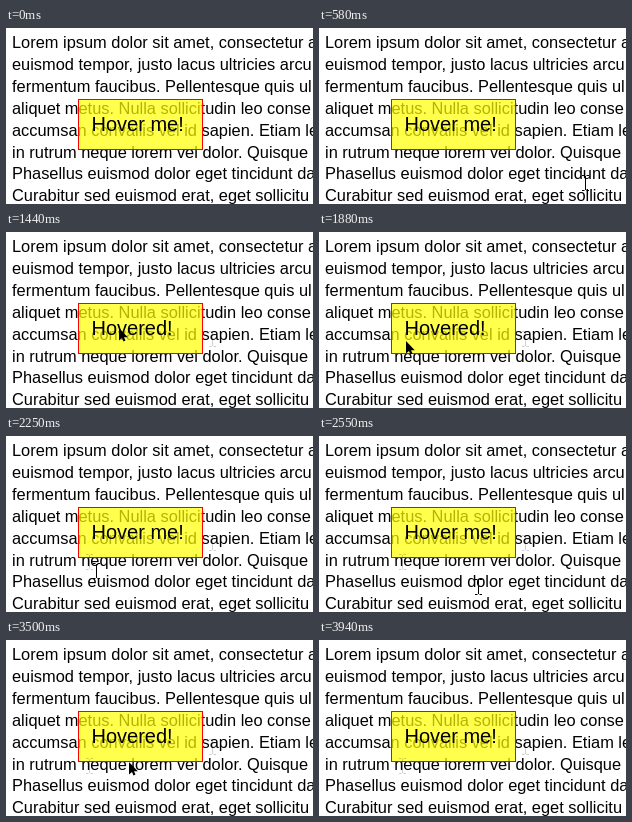
An HTML page for the animation above (4.44 s loop, 307 by 176 pixels).

```html
<!DOCTYPE html>
<html lang="en">
<head>
<meta charset="utf-8">
<title>Hover tooltip</title>
<style>
  html, body { margin: 0; width: 100%; height: 100%; overflow: hidden; background: #fff; }
  svg { display: block; width: 307px; height: 176px; font-family: "Liberation Sans", Arial, sans-serif; }
  #copy { font-size: 16.4px; }
  #label { font-size: 20px; }
  .box { fill: rgba(255, 255, 0, .7); stroke: #f00; }
  .beam { fill: none; stroke: #000; }
  .trail { opacity: .18; }
</style>
</head>
<body>
<svg viewBox="0 0 307 176">
  <defs>
    <path id="beam" class="beam" d="M-3 -7.5H-.5M1.5 -7.5H4M-3 7.5H-.5M1.5 7.5H4M.5 -7V7"/>
    <path id="arrow" d="M1 1V13.5L4 11L5.5 14.5L7.5 13.6L6 10.3H9.8Z"/>
  </defs>
  <g id="copy"></g>
  <rect class="box" x="72.5" y="71.5" width="124" height="50"/>
  <text id="label" x="85.5" y="103">Hover me!</text>
  <use class="trail" href="#beam"/>
  <use class="trail" href="#beam"/>
  <use id="cursor" href="#beam"/>
</svg>
<script>
  const LOOP = 4440, START = 430, STEP = 73.125;
  const STROKE = 8; // steps per pointer stroke
  const lines = [
    "Lorem ipsum dolor sit amet, consectetur a",
    "euismod tempor, justo lacus ultricies arcu",
    "fermentum faucibus. Pellentesque quis ul",
    "aliquet metus. Nulla sollicitudin leo conse",
    "accumsan convallis vel id sapien. Etiam le",
    "in rutrum neque lorem vel dolor. Quisque",
    "Phasellus euismod dolor eget tincidunt da",
    "Curabitur sed euismod erat, eget sollicitu"
  ];
  // Quadratic strokes: each has a control point and an end point.
  const origin = { x: 293, y: 181 };
  const stroke = (cx, cy, x, y) => ({ cx, cy, x, y });
  const strokes = [
    stroke(257, 146, 222, 111),
    stroke(159, 96, 96, 95),
    stroke(88, 105, 80, 115),
    stroke(84, 164, 218, 146),
    stroke(253, 130, 138, 112),
    stroke(73, 113, 240, 170)
  ];
  const steps = strokes.length * STROKE;

  const $ = id => document.getElementById(id);
  const copy = $("copy"), label = $("label"), cursor = $("cursor");

  lines.forEach((line, i) => {
    const text = document.createElementNS("http://www.w3.org/2000/svg", "text");
    text.setAttribute("x", 6);
    text.setAttribute("y", Math.round(20 + 21.9 * i));
    text.textContent = line;
    copy.append(text);
  });

  const bezier = (a, c, b, u) =>
    Math.round((1 - u) ** 2 * a + 2 * u * (1 - u) * c + u * u * b);

  function pointAt(step) {
    const i = Math.floor(step / STROKE);
    const u = (step % STROKE + 1) / STROKE;
    const from = strokes[i - 1] || origin, to = strokes[i];
    return [bezier(from.x, to.cx, to.x, u), bezier(from.y, to.cy, to.y, u)];
  }

  const place = (el, [x, y]) => el.setAttribute("transform", `translate(${x} ${y})`);
  const show = (el, on) => el.setAttribute("visibility", on ? "visible" : "hidden");

  // Faint pointer traces stay where two of the strokes begin.
  const trails = [...document.querySelectorAll(".trail")].map((el, i) => {
    const step = STROKE * (1 + 2 * i);
    place(el, pointAt(step));
    return { el, step };
  });

  function draw(t) {
    // A little slack lets a step begin slightly early.
    const step = Math.floor((t - START) / STEP + .2);
    const moving = step >= 0 && step < steps;
    let hovered = false;
    if (moving) {
      const [x, y] = pointAt(step);
      hovered = x >= 72 && x < 197 && y >= 71 && y < 122;
      cursor.setAttribute("href", hovered ? "#arrow" : "#beam");
      place(cursor, [x, y]);
    }
    show(cursor, moving);
    trails.forEach(trail => show(trail.el, step > trail.step));
    label.textContent = hovered ? "Hovered!" : "Hover me!";
  }

  const begin = performance.now();
  function tick() {
    draw((performance.now() - begin) % LOOP);
    requestAnimationFrame(tick);
  }
  tick();
</script>
</body>
</html>
```
